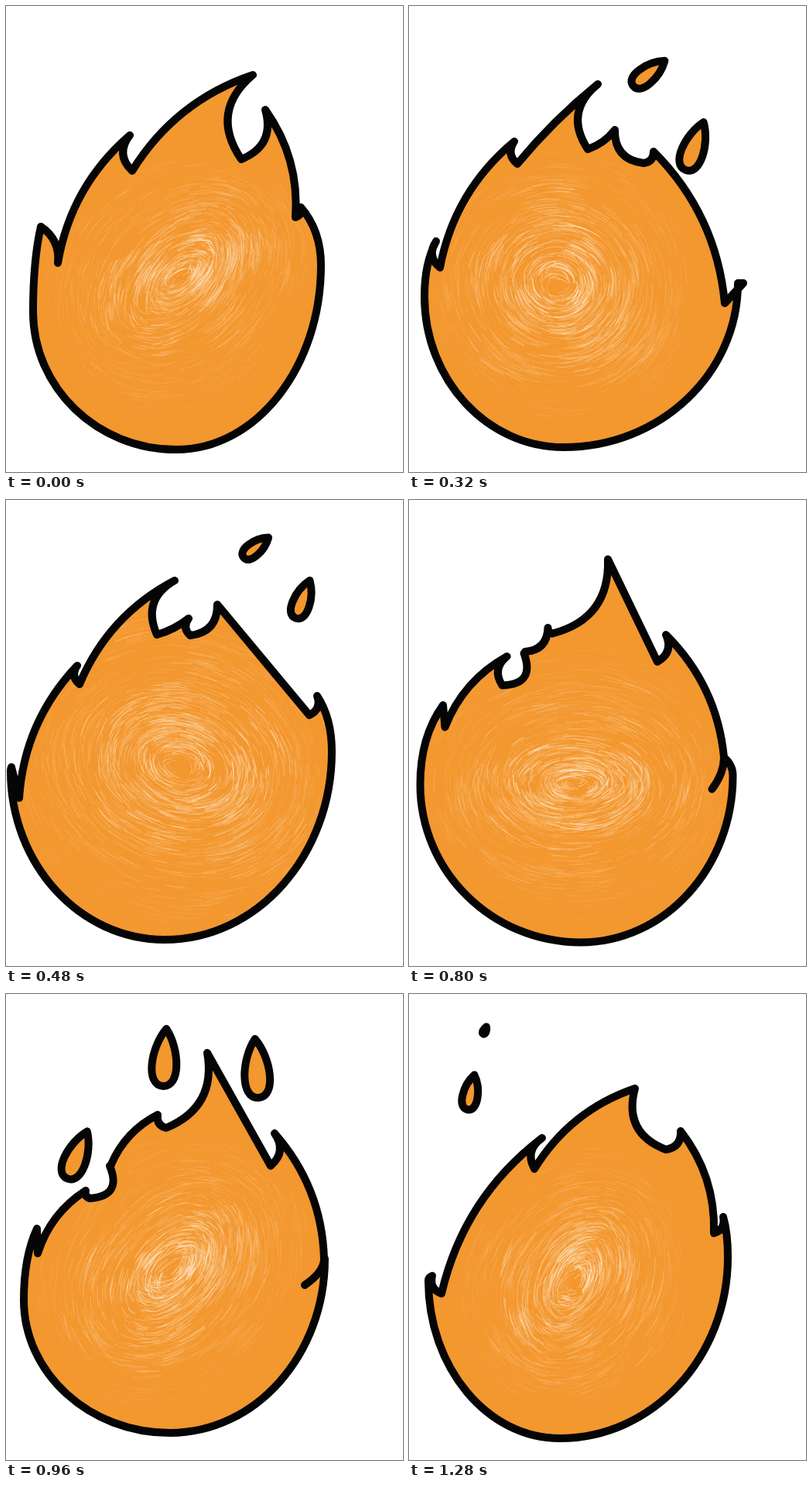
Recreate the animation shown at these times as an HTML page with a canvas. Size 513 by 602 pixels, loop 1440 ms.

```html
<!DOCTYPE html>
<html lang="en">
<head>
<meta charset="utf-8">
<title>Fireball</title>
<style>
html, body { margin: 0; width: 100%; height: 100%; overflow: hidden; background: #fff; }
canvas { display: block; }
</style>
</head>
<body>
<canvas id="stage" width="513" height="602"></canvas>
<script>
const ctx = document.getElementById('stage').getContext('2d');
const STEP = 160, POSES = 9, ROUND = .5523;

// bowl: leftmost, lowest and rightmost point.
// crown: tip, notch, tip, notch ... tip from left to right, with an optional bend.
// swirl: centre x and y, reach, width-to-length ratio, tilt.
const keys = {
  0: {
    bowl: [35, 395, 220, 573, 407, 335],
    crown: '45,285 67,332,.3 160,167 163,213 319,89 304,198 335,134 374,273 381,260',
    swirl: [225, 350, 175, .4, -.75]
  },
  2: {
    bowl: [20, 375, 200, 570, 425, 358],
    crown: '35,304 40,338 136,175 140,204 244,101,.05 231,185 266,160,-.15 303,203 316,188 408,384 432,358,0',
    swirl: [192, 360, 165, .9, .3]
  },
  3: {
    bowl: [6, 350, 205, 568, 421, 325],
    crown: '7,345 17,385,0 92,214 95,238 218,104 195,174 236,153,-.1 238,175 273,135 392,278,0 402,253',
    swirl: [225, 343, 220, .65, .3]
  },
  4: {
    bowl: [6, 340, 232, 576, 425, 370],
    crown: '48,227 52,252 150,150 133,215 163,174,-.75 164,172 254,77 300,196 317,168 403,323',
    swirl: [218, 375, 205, .5, .8]
  },
  6: {
    bowl: [23, 395, 212, 567, 412, 342],
    crown: '40,303 41,335,0 103,254 108,264 134,222,-.7 136,220 196,156 207,173 260,76,-.4 342,222,0 347,180 411,342',
    swirl: [212, 357, 175, .42, -.85]
  },
  8: {
    bowl: [25, 370, 195, 574, 412, 340],
    crown: '30,364 42,387 172,186 162,226 292,122 332,201 351,177 394,309 406,288',
    swirl: [215, 370, 160, .5, -1.05]
  }
};
// A flap of flame folds inwards at the right edge.
keys[4].hook = [397, 371];
keys[6].hook = [386, 376];

// Sparks fly from (x, y) by (dx, dy) within two poses and shrink.
const sparks = [
  { born: 2, x: 310, y: 87, dx: 30, dy: -59, size: 52, lean: .9 },
  { born: 2, x: 369, y: 181, dx: 33, dy: -121, size: 66, lean: .36 },
  { born: 6, x: 92, y: 208, dx: 6, dy: -161, size: 66, lean: .4 },
  { born: 6, x: 205, y: 82, dx: 10, dy: -115, size: 74, lean: .06 },
  { born: 6, x: 324, y: 96, dx: 7, dy: -130, size: 76, lean: -.06 },
  { born: 7, x: 80, y: 190, dx: 0, dy: -145, size: 58, lean: .2 }
];

for (const key of Object.values(keys))
  key.crown = key.crown.split(' ').map(p => p.split(',').map(Number));

const mean = (a, b) => a.map((v, i) => (v + b[i]) / 2);

// Halfway pose: every tongue starts from its counterpart in the pose before.
function between(a, b) {
  const ratio = (a.crown.length - 1) / (b.crown.length - 1);
  return {
    bowl: mean(a.bowl, b.bowl),
    swirl: mean(a.swirl, b.swirl),
    hook: a.hook && b.hook && mean(a.hook, b.hook),
    crown: b.crown.map(([x, y, bend], i) => {
      const twin = 2 * Math.ceil((i >> 1) * ratio - .5) + i % 2;
      return [...mean([x, y], a.crown[twin]), bend];
    })
  };
}

// Long sides swell outwards, short ones curl into the flame.
function addSide(path, [ax, ay], [bx, by, bend], rising) {
  const dx = bx - ax, dy = by - ay;
  bend ??= Math.hypot(dx, dy) > (rising ? 85 : 130) ? .18 : -.45;
  path.quadraticCurveTo((ax + bx) / 2 + dy * bend, (ay + by) / 2 - dx * bend, bx, by);
}

function flame({ bowl: [lx, ly, bx, by, rx, ry], crown }) {
  const path = new Path2D(), first = crown[0], last = crown[crown.length - 1];
  path.moveTo(lx, ly);
  path.quadraticCurveTo(lx, ly + .6 * (first[1] - ly), first[0], first[1]);
  for (let i = 1; i < crown.length; i++) addSide(path, crown[i - 1], crown[i], i % 2 === 0);
  path.quadraticCurveTo(rx, ry + .6 * (last[1] - ry), rx, ry);
  path.bezierCurveTo(rx, ry + (by - ry) * ROUND, bx + (rx - bx) * ROUND, by, bx, by);
  path.bezierCurveTo(bx + (lx - bx) * ROUND, by, lx, ly + (by - ly) * ROUND, lx, ly);
  path.closePath();
  return path;
}

function randomizer(seed) {
  return () => (seed = seed * 16807 % 2147483647) / 2147483647;
}

// Pale brush hairs in small clumps, following tilted rings
function drawSwirl([cx, cy, reach, ratio, tilt], seed) {
  const rnd = randomizer(seed), spread = n => (rnd() - .5) * n;
  ctx.strokeStyle = '#fff4e2';
  for (let i = 0; i < reach * 1.5; i++) {
    const ring = .12 + .95 * rnd() ** .8, turn = rnd() * 7;
    const glow = (.08 + .4 * rnd()) * (1.15 - ring);
    const lean = tilt + spread(.4);
    for (let j = 0; j < 9; j++) {
      const s = Math.max(.08, ring + spread(.13)), a = reach * s;
      const b = a * (ratio + (1 - ratio) * s * .7);
      const from = turn + spread(.5), sweep = Math.min(.9, (12 + 28 * rnd()) / a);
      ctx.globalAlpha = glow * (.5 + rnd());
      ctx.lineWidth = .5 + rnd() * .8;
      ctx.beginPath();
      ctx.ellipse(cx + spread(14), cy + spread(14), a, b, lean + spread(.2), from, from + sweep);
      ctx.stroke();
    }
  }
}

function ink(path) {
  ctx.strokeStyle = '#050505';
  ctx.lineWidth = 10;
  ctx.stroke(path);
}

function drawSpark({ born, x, y, dx, dy, size, lean }, index) {
  const t = (index - born) / 2;
  if (t < 0 || t > 1) return;
  const go = t ** 1.2, h = size * (1 - .85 * t * t) / 2, w = h * .52;
  const drop = new Path2D();
  drop.moveTo(0, -h);
  drop.bezierCurveTo(w, -h * .3, w * 1.2, h, 0, h);
  drop.bezierCurveTo(-w * 1.2, h, -w, -h * .3, 0, -h);
  ctx.save();
  ctx.translate(x + dx * go, y + dy * go);
  ctx.rotate(lean);
  ctx.fill(drop);
  ink(drop);
  ctx.restore();
}

function drawHook([tx, ty], [hx, hy]) {
  const path = new Path2D();
  path.moveTo(tx, ty);
  path.quadraticCurveTo(tx, (ty + hy) / 2, hx, hy);
  ink(path);
}

function draw(index) {
  const pose = keys[index] || between(keys[index - 1], keys[index + 1]);
  const outline = flame(pose);
  ctx.fillStyle = '#fff';
  ctx.fillRect(0, 0, 513, 602);
  ctx.lineCap = ctx.lineJoin = 'round';
  ctx.fillStyle = '#f3972f';
  ctx.fill(outline);
  ctx.save();
  ctx.clip(outline);
  drawSwirl(pose.swirl, 4271 + index * 977);
  ctx.restore();
  ink(outline);
  if (pose.hook) drawHook(pose.crown[pose.crown.length - 1], pose.hook);
  sparks.forEach(spark => drawSpark(spark, index));
}

let shown = -1;
function tick() {
  const index = Math.floor(performance.now() / STEP) % POSES;
  if (index !== shown) draw(shown = index);
  requestAnimationFrame(tick);
}
tick();
</script>
</body>
</html>
```
